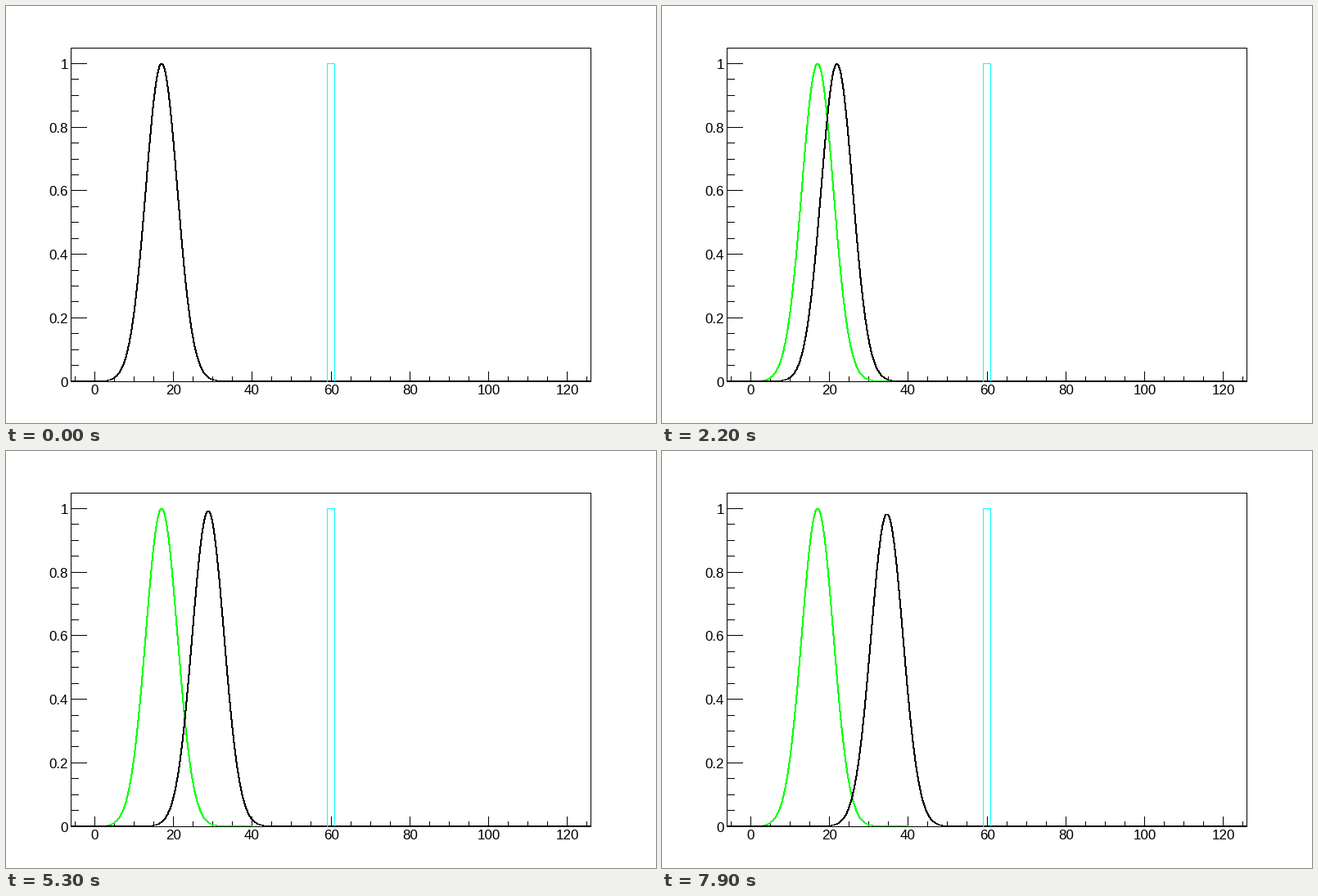
A matplotlib script that plays this animation: 794 by 510 pixels, repeating every 8 s.

```python
import numpy as np
import matplotlib.pyplot as plt
from matplotlib.animation import FuncAnimation

W, H, DPI = 794, 510, 64  # power of two keeps the size exact
FRAMES, INTERVAL = 80, 100
PX = 72 / DPI  # one pixel in points

LEFT, RIGHT, TOP, BASE = 79, 714, 51, 459
X_SCALE = 0.8 * W / 132
Y_SCALE = 0.8 * H / 1.05

START, SIGMA = 17, 4
SPEED, SPREAD = 0.223, 0.00235  # per frame

plt.rcParams["path.simplify"] = False
plt.rcParams["font.family"] = "Liberation Sans"

fig = plt.figure(figsize=(W / DPI, H / DPI), dpi=DPI, facecolor="white")
ax = fig.add_axes([0, 0, 1, 1])
ax.set_xlim(0, W)
ax.set_ylim(H, 0)
ax.axis("off")


def to_x(v):
    return int(np.floor(0.1 * W + (v + 6) * X_SCALE + 1e-6))


def to_y(v):
    return int(np.floor(0.9 * H - v * Y_SCALE + 1e-6))


def stroke(xs, ys, color="black", z=1):
    """One pixel wide hard-edged line through pixel centres."""
    line, = ax.plot(np.asarray(xs) + 0.5, np.asarray(ys) + 0.5, color=color,
                    lw=PX, antialiased=False, snap=False, zorder=z,
                    solid_capstyle="projecting", solid_joinstyle="round")
    return line


def label(x, y, s, ha):
    ax.text(x, y, s, ha=ha, va="baseline", fontsize=17 * PX, color="black")


def packet(cols, t):
    """Pixel rows of the spreading Gaussian at step t."""
    grow = np.sqrt(1 + (SPREAD * t) ** 2)
    v = (cols + 0.5 - 0.1 * W) / X_SCALE - 6
    g = np.exp(-((v - START - SPEED * t) / (SIGMA * grow)) ** 2 / 2) / grow
    return np.floor(0.9 * H - g * Y_SCALE - 1e-6)


# frame and axes
stroke([LEFT, RIGHT, RIGHT, LEFT, LEFT], [TOP, TOP, BASE, BASE, TOP])
for v in range(-5, 126, 5):
    x, major = to_x(v), v % 20 == 0
    stroke([x, x], [BASE - (12 if major else 6), BASE])
    if major:
        label(x + 0.5, 475, str(v), "center")
for i in range(21):
    y, major = to_y(i / 20), i % 4 == 0
    stroke([LEFT, LEFT + (19 if major else 9)], [y, y])
    if major:
        label(76, y + 7, f"{i / 20:g}", "right")

# barrier
a, b = to_x(59), to_x(61)
stroke([a, a, b, b], [BASE, to_y(1), to_y(1), BASE - 1], "#00ffff", 4)

# initial packet below, moving packet on top
cols = np.arange(LEFT, RIGHT + 1)
initial = cols[cols <= to_x(40)]
stroke(initial, packet(initial, 0), "#00ff00", 2)
moving = stroke(cols, packet(cols, 0), "black", 3)


def update(t):
    moving.set_ydata(packet(cols, t) + 0.5)
    return moving,


anim = FuncAnimation(fig, update, frames=FRAMES, interval=INTERVAL,
                     repeat=True, repeat_delay=0, blit=False)
plt.show()
```
